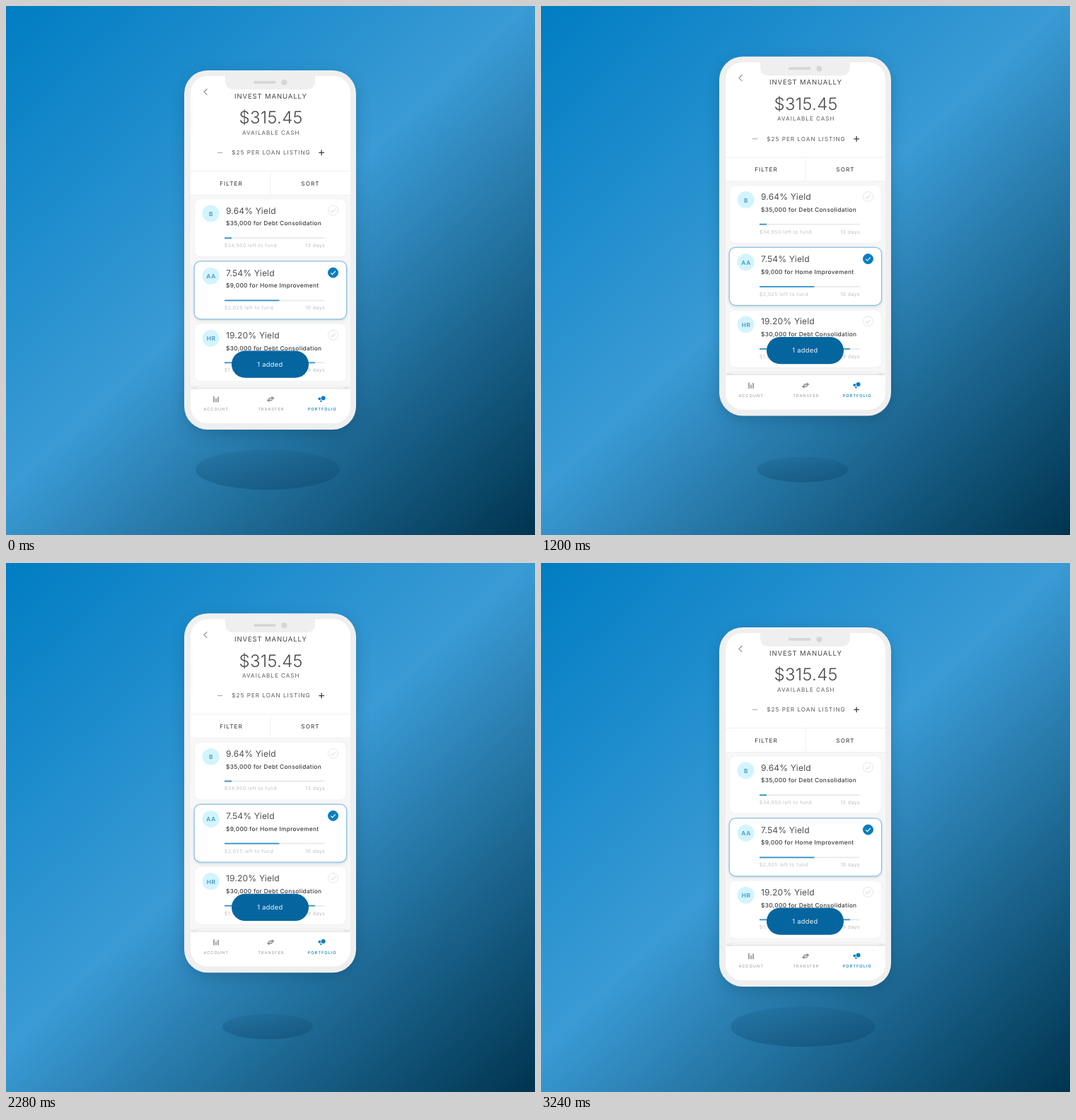
Write an HTML page that moves like this. It is 748 px wide and 748 px high and loops after 3840 ms.

```html
<!DOCTYPE html>
<html lang="en">
<head>
<meta charset="utf-8">
<title>Invest manually</title>
<style>
  html, body { margin: 0; width: 100%; height: 100%; overflow: hidden; }
  body { background: linear-gradient(137deg, #007dc3 0%, #3a9bd5 47.5%, #00344f 100%); }
  svg { display: block; width: 748px; height: 748px; }
  text { font-family: Inter, Roboto, sans-serif; text-rendering: geometricPrecision; }
</style>
</head>
<body>
<svg viewBox="0 0 748 748">
  <defs>
    <linearGradient id="floor" x1="0" y1="0" x2="0" y2="1">
      <stop offset="0" stop-color="#003255" stop-opacity=".1"/>
      <stop offset="1" stop-color="#003255" stop-opacity=".28"/>
    </linearGradient>
    <filter id="blur" x="-20%" y="-20%" width="140%" height="140%"><feGaussianBlur stdDeviation="11"/></filter>
    <filter id="soft" x="-10%" y="-20%" width="120%" height="140%"><feGaussianBlur stdDeviation="2"/></filter>
    <clipPath id="screen"><rect x="261" y="99" width="226" height="491" rx="24"/></clipPath>
  </defs>
  <ellipse id="shade" rx="102" ry="28.5" fill="url(#floor)"/>
  <g id="phone">
    <rect x="254" y="99" width="239" height="504" rx="33" fill="#00304f" opacity=".3" filter="url(#blur)"/>
    <rect x="252" y="91" width="243" height="508" rx="33" fill="#efefef"/>
    <g clip-path="url(#screen)">
      <rect x="261" y="99" width="226" height="491" fill="#fff"/>
      <rect x="261" y="267" width="226" height="275" fill="#f7f7f7"/>
      <path d="M261 233.5H487M374 234V267M261 267.5H487" stroke="#efefef" fill="none"/>
      <g id="cards"></g>
      <rect x="261" y="540" width="226" height="20" fill="#000" opacity=".14" filter="url(#soft)"/>
      <rect x="261" y="541.5" width="226" height="49" fill="#fff"/>
      <path d="M309 98H438Q437 99 437 103V105Q437 118 424 118H323Q310 118 310 105V103Q310 99 309 98Z" fill="#efefef"/>
    </g>
    <rect x="350" y="106" width="31.5" height="3.8" rx="1.9" fill="#d6d6d6"/>
    <circle cx="393.4" cy="108" r="4" fill="#d6d6d6"/>
    <path d="M284.4 117L280 121.3L284.4 125.6" fill="none" stroke="#8c8c8c" stroke-width="1.1"/>
    <path d="M299 207.3H306" stroke="#a5a5a5" stroke-width="1.1"/>
    <path d="M442.3 207.3H450M446.1 203.4V211.2" stroke="#3c3c3c" stroke-width="1.3"/>
    <rect x="319" y="487.5" width="109" height="38.3" rx="19.1" fill="#04659f"/>
    <path d="M294 552V560.3M297 555V560.3M300 552.6V560.3" stroke="#a3a3a3" stroke-width="2"/>
    <g fill="#8f8f8f">
      <path d="M371.5 553.8H375.6V551.7L379.6 554.5L375.6 557.3V555.2H371.5Z"/>
      <path d="M376.5 556.8H372.6V554.9L368.6 557.5L372.6 560.2V558.2H376.5Z"/>
    </g>
    <g fill="#087dc1">
      <circle cx="448.6" cy="554.6" r="3"/>
      <circle cx="443.3" cy="555.4" r="1.9"/>
      <circle cx="445.4" cy="558.8" r="1.2"/>
    </g>
    <g id="labels"></g>
  </g>
</svg>
<script>
const $ = id => document.getElementById(id);

function add(parent, tag, attrs, text) {
  const el = document.createElementNS('http://www.w3.org/2000/svg', tag);
  for (const k in attrs) el.setAttribute(k, attrs[k]);
  if (text) el.textContent = text;
  parent.append(el);
  return el;
}

// y is the middle of the capitals; anchored text is corrected for trailing spacing
function label(parent, text, x, y, size, gap, fill, weight = 400, anchor = 'middle') {
  const shift = { start: 0, middle: gap / 2, end: gap }[anchor];
  add(parent, 'text', {
    x: x + shift, y: y + size * 0.364, fill, 'font-size': size, 'font-weight': weight,
    'letter-spacing': gap, 'text-anchor': anchor
  }, text);
}

const labels = [
  ['INVEST MANUALLY', 374, 127.2, 9.5, 0.9, '#454545'],
  ['$315.45', 374.5, 157.5, 24, 0.3, '#4a4a4a', 300],
  ['AVAILABLE CASH', 374.3, 178.8, 8, 1.05, '#5c5c5c'],
  ['$25 PER LOAN LISTING', 374.5, 207.2, 8.2, 1, '#5c5c5c'],
  ['FILTER', 318, 250.8, 8.1, 1.1, '#4a4a4a', 500],
  ['SORT', 430, 250.8, 8.1, 1.1, '#4a4a4a', 500],
  ['1 added', 373.2, 506.6, 9.3, 0.3, '#eef6fb'],
  ['ACCOUNT', 296.7, 570.3, 5.7, 0.95, '#9a9a9a'],
  ['TRANSFER', 374.3, 570.3, 5.7, 0.95, '#9a9a9a'],
  ['PORTFOLIO', 446.6, 570.3, 5.7, 0.95, '#087dc1', 500]
];
labels.forEach(l => label($('labels'), ...l));

const cards = [
  { grade: 'B', rate: '9.64%', goal: '$35,000 for Debt Consolidation', end: 319, left: '$34,950', days: 13 },
  { grade: 'AA', rate: '7.54%', goal: '$9,000 for Home Improvement', end: 386.5, left: '$2,025', days: 10, on: true },
  { grade: 'HR', rate: '19.20%', goal: '$30,000 for Debt Consolidation', end: 437, left: '$1,950', days: 9 },
  {}
];

cards.forEach((c, i) => {
  const g = add($('cards'), 'g', { transform: `translate(0 ${i * 88.1})` });
  const box = { x: 266.2, y: 272.7, width: 215.4, height: 82, rx: 9 };
  if (c.on) add(g, 'rect', { ...box, y: 274, fill: '#1c5f8a', opacity: 0.25, filter: 'url(#soft)' });
  add(g, 'rect', { ...box, fill: '#fff', stroke: c.on ? '#8ac1e0' : '#f0f0f0', 'stroke-width': c.on ? 1.2 : 1 });
  if (!c.grade) return;

  add(g, 'circle', { cx: 289.6, cy: 293.6, r: 12, fill: '#d3f4fe' });
  label(g, c.grade, 289.8, 294, 8.3, 0.7, '#3f97c8', 600);
  label(g, c.rate + ' Yield', 311, 289.2, 12.1, 0.15, '#4f4f4f', 400, 'start');
  label(g, c.goal, 311, 307.3, 8.4, 0.3, '#3d3d3d', 500, 'start');

  add(g, 'circle', { cx: 462.5, cy: 289, r: 7, fill: c.on ? '#087dc1' : '#fff', stroke: c.on ? '#087dc1' : '#e6e6e6' });
  add(g, 'path', {
    d: 'M459.2 289.3L461.5 291.5L465.8 286.9', fill: 'none',
    stroke: c.on ? '#fff' : '#dedede', 'stroke-width': 1.1
  });

  add(g, 'path', { d: 'M309 328.2H450.5', stroke: '#e6e9eb', 'stroke-width': 1.8 });
  add(g, 'path', { d: `M309 328.2H${c.end}`, stroke: '#2f91cb', 'stroke-width': 1.8 });
  label(g, c.left + ' left to fund', 308.8, 338.6, 7, 0.42, '#c4c4c4', 400, 'start');
  label(g, c.days + ' days', 450.7, 338.6, 7, 0.42, '#bcbcbc', 400, 'end');
});

const LOOP = 3840, STEP = 40, MOVE = 1200, UP = 600, DOWN = 2040, RISE = 28.5;

// cubic-bezier(0, 0, .58, 1)
function easeOut(x) {
  if (x <= 0) return 0;
  if (x >= 1) return 1;
  let lo = 0, hi = 1;
  for (let i = 0; i < 24; i++) {
    const u = (lo + hi) / 2;
    if (1.74 * u * u - 0.74 * u ** 3 < x) lo = u; else hi = u;
  }
  return 3 * lo * lo - 2 * lo ** 3;
}

function draw(ms) {
  const t = Math.floor((ms % LOOP) / STEP) * STEP;
  const lift = easeOut((t - UP) / MOVE) - easeOut((t - DOWN) / MOVE);
  $('phone').setAttribute('transform', `translate(0 ${-RISE * lift})`);
  $('shade').setAttribute('transform', `translate(370 655.5) scale(${1 - 0.54 * lift})`);
}

const start = performance.now();
function tick() {
  draw(performance.now() - start);
  requestAnimationFrame(tick);
}
tick();
</script>
</body>
</html>
```
